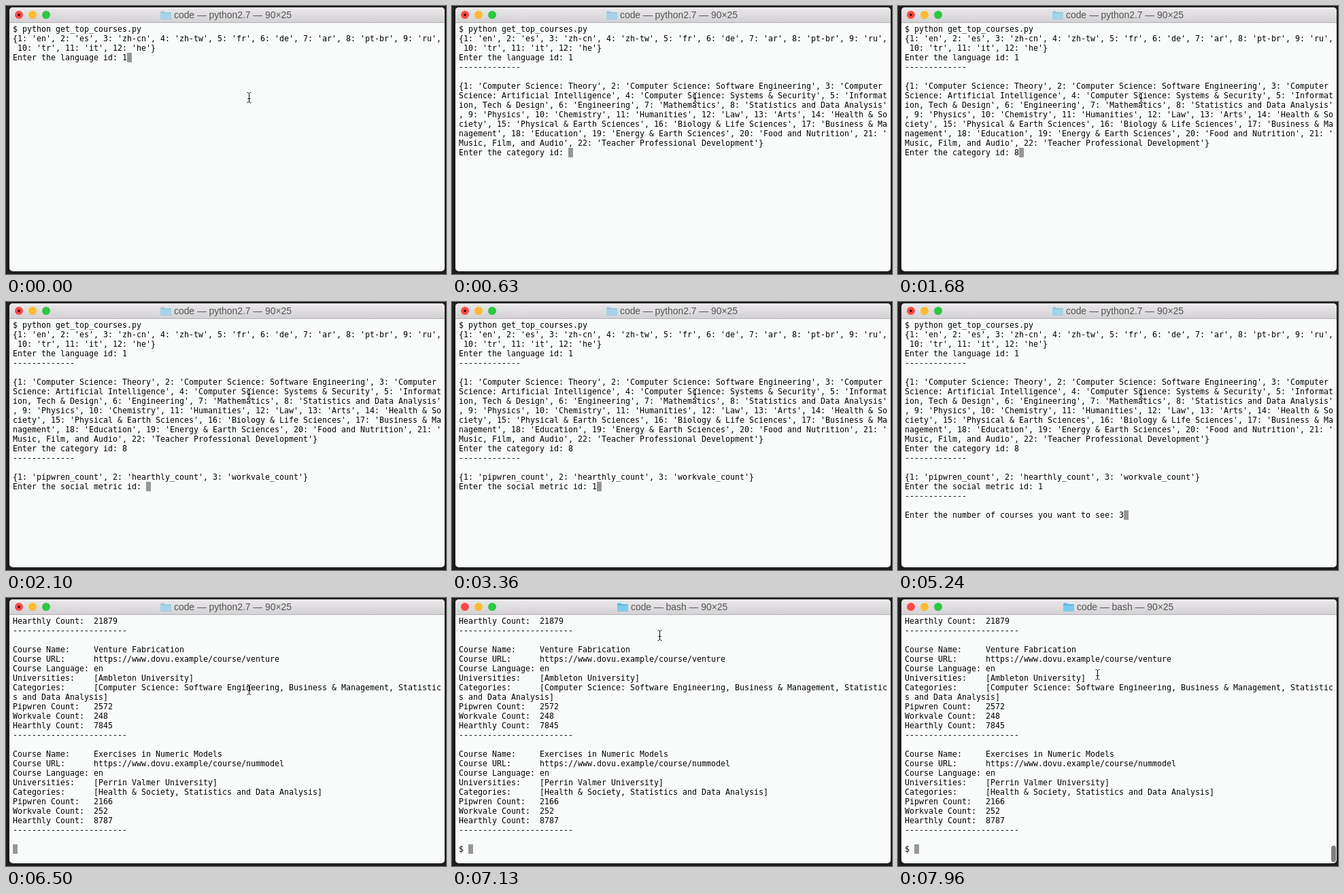
Recreate the animation shown at these times as an HTML page. Size 647x395 px, loop 8000 ms.

```html
<!DOCTYPE html>
<html lang="en">
<head>
<meta charset="utf-8">
<title>Terminal</title>
<style>
  html, body { margin: 0; width: 100%; height: 100%; overflow: hidden; background: #1d1d1b; }
  #stage { position: relative; width: 647px; height: 395px; overflow: hidden; }
  #stage * { position: absolute; box-sizing: border-box; }
  #window { left: 5px; top: 2px; width: 640px; height: 389px; border-radius: 5px; background: #f9fbfa; overflow: hidden; }
  #bar { left: 0; top: 0; width: 640px; height: 23px; background: linear-gradient(#ebe9eb, #d3d1d3); border-bottom: 1px solid #b4b2b4; }
  .light { top: 7px; width: 12px; height: 12px; border-radius: 50%; }
  #busy { left: 17px; top: 11px; width: 4px; height: 4px; border-radius: 50%; background: #4d0000; }
  #title { top: 5px; font: 13.86px/17px "Liberation Sans", Arial, sans-serif; color: #555; white-space: pre; }
  #text, #mark { font: 11.6px/14px "DejaVu Sans Mono", Menlo, monospace; }
  #text { left: 10px; top: 27px; margin: 0; color: #000; letter-spacing: calc(7px - 1ch); white-space: pre; font-variant-ligatures: none; }
  #mark { width: 7px; height: 14px; background: #979797; }
  #thumb { left: 636.5px; top: 365px; width: 7px; height: 24px; border-radius: 4px; background: #7f7f7f; }
  svg { left: 0; top: 0; }
</style>
</head>
<body>
<div id="stage">
  <div id="window"><div id="bar"></div></div>
  <i class="light" style="left:13px;background:#fc4b48"></i>
  <i class="light" style="left:33px;background:#fdbc30"></i>
  <i class="light" style="left:53px;background:#2bc840"></i>
  <i id="busy"></i>
  <span id="title"></span>
  <i id="mark"></i>
  <pre id="text"></pre>
  <i id="thumb"></i>
  <svg width="647" height="395">
    <g id="folder">
      <path d="M0 1.5q0-1.5 1.5-1.5h3.5l1.5 1.5h8q1.5 0 1.5 1.5v8q0 1-1 1h-14q-1 0-1-1z" fill="#62b7e2"/>
      <path d="M0 3.5h16v7.5q0 1-1 1h-14q-1 0-1-1z" fill="#7accf0"/>
    </g>
    <path id="beam" d="M-3-7.5h1.5l1.5 1.5 1.5-1.5h1.5M0-6.5v13M-3 7.5h1.5l1.5-1.5 1.5 1.5h1.5M-2 1.5h4" fill="none" stroke="#111"/>
  </svg>
</div>
<script>
const LOOP = 8000, COLS = 90, CELL_W = 7, CELL_H = 14, LEFT = 10, TOP = 27;
const $ = id => document.getElementById(id);
const rule = n => "-".repeat(n) + "\n\n";
const wrap = text => text.split("\n")
  .flatMap(line => line.match(new RegExp(`.{1,${COLS}}`, "g")) || [""]);
const dict = items => "{" + items.map((item, i) => `${i + 1}: '${item}'`).join(", ") + "}\n";

const languages = "en es zh-cn zh-tw fr de ar pt-br ru tr it he".split(" ");
const categories = [
  "Computer Science: Theory", "Computer Science: Software Engineering",
  "Computer Science: Artificial Intelligence", "Computer Science: Systems & Security",
  "Information, Tech & Design", "Engineering", "Mathematics", "Statistics and Data Analysis",
  "Physics", "Chemistry", "Humanities", "Law", "Arts", "Health & Society",
  "Physical & Earth Sciences", "Biology & Life Sciences", "Business & Management",
  "Education", "Energy & Earth Sciences", "Food and Nutrition", "Music, Film, and Audio",
  "Teacher Professional Development"
];
const metrics = ["pipwren_count", "hearthly_count", "workvale_count"];

const askLanguage = "$ python get_top_courses.py\n" + dict(languages) + "Enter the language id: ";
const askCategory = askLanguage + "1\n" + rule(13) + dict(categories) + "Enter the category id: ";
const askMetric = askCategory + "8\n" + rule(13) + dict(metrics) + "Enter the social metric id: ";
const askNumber = askMetric + "1\n" + rule(13) + "Enter the number of courses you want to see: ";

const field = (label, value) => (label + ":").padEnd(17) + value + "\n";
const course = (name, slug, school, topics, counts) =>
  field("Course Name", name) +
  field("Course URL", "https://www.dovu.example/course/" + slug) +
  field("Course Language", "en") +
  field("Universities", `[${school} University]`) +
  field("Categories", `[${topics}]`) +
  ["Pipwren", "Workvale", "Hearthly"].map((site, i) => field(site + " Count", counts[i])).join("") +
  rule(24);
const results = field("Hearthly Count", 21879) + rule(24) +
  course("Venture Fabrication", "venture", "Ambleton",
    "Computer Science: Software Engineering, Business & Management, Statistics and Data Analysis",
    [2572, 248, 7845]) +
  course("Exercises in Numeric Models", "nummodel", "Perrin Valmer",
    "Health & Society, Statistics and Data Analysis", [2166, 252, 8787]);

// Each step: start time in ms, value
const screens = [
  [0, askLanguage + "1"], [630, askCategory], [1680, askCategory + "8"],
  [2100, askMetric], [3360, askMetric + "1"], [3980, askNumber],
  [5240, askNumber + "3"], [6500, results], [6710, results + "$ "]
].map(([start, text]) => [start, wrap(text)]);
const pointer = [
  [0, [357.5, 135]], [7130, [305.5, 55]], [7340, [298.5, 42]],
  [7540, [293.5, 104]], [7750, [293.5, 113]]
];
const at = (steps, t) => steps.findLast(([start]) => start <= t)[1];

let shown;
function showScreen(lines) {
  if (lines === shown) return;
  shown = lines;
  $("text").textContent = lines.join("\n");
  $("mark").style.left = LEFT + CELL_W * lines.at(-1).length + "px";
  $("mark").style.top = TOP + CELL_H * (lines.length - 1) + "px";
}

function draw(t) {
  const running = t < 6710;
  const iconX = running ? 227 : 243;
  showScreen(at(screens, t));
  $("title").textContent = `code — ${running ? "python2.7" : "bash"} — 90×25`;
  $("title").style.left = iconX + 20 + "px";
  $("folder").setAttribute("transform", `translate(${iconX} 7.5)`);
  $("folder").setAttribute("opacity", running ? 0.55 : 1);
  $("busy").hidden = !running;
  $("thumb").hidden = t < 7960;
  $("beam").setAttribute("transform", `translate(${at(pointer, t)})`);
}

const begin = performance.now();
function tick() {
  draw((performance.now() - begin) % LOOP);
  requestAnimationFrame(tick);
}
tick();
</script>
</body>
</html>
```
